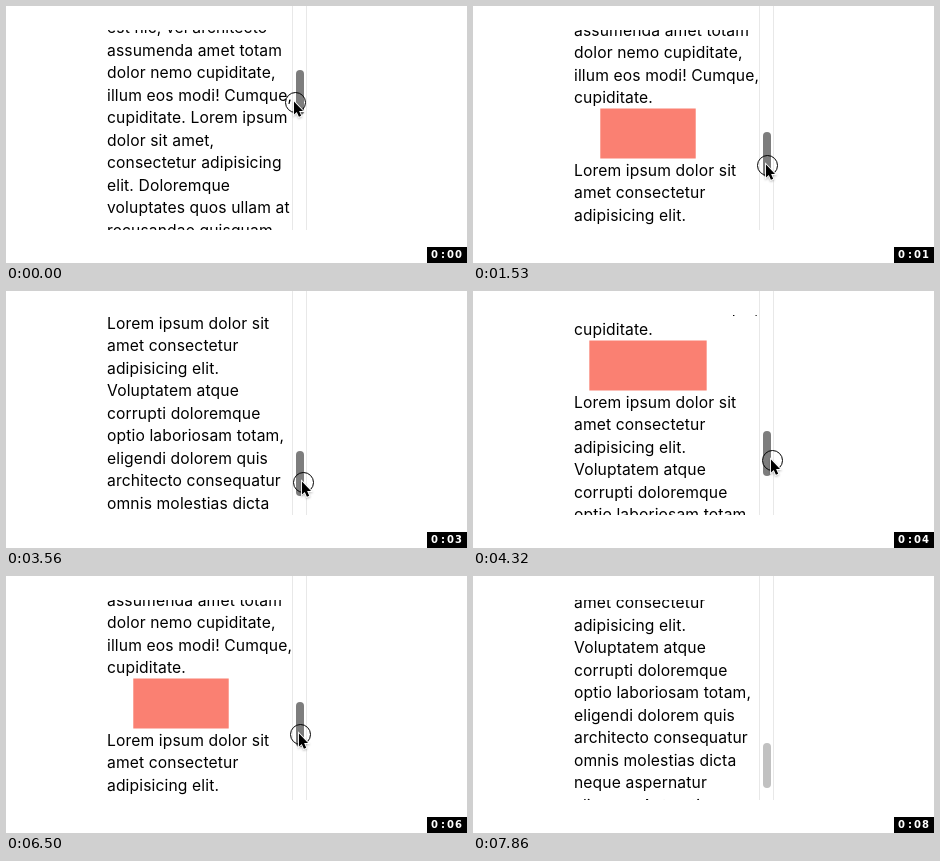
An HTML page for the animation above (8430 ms loop, 461 by 257 pixels).

```html
<!DOCTYPE html>
<html lang="la">
<head>
<meta charset="utf-8">
<title>Scroll-driven box</title>
<style>
  /* Integer properties snap positions to whole pixels */
  @property --y { syntax: "<number>"; inherits: true; initial-value: 64.3; }
  @property --lag { syntax: "<number>"; inherits: true; initial-value: 32; }
  @property --top { syntax: "<integer>"; inherits: true; initial-value: 0; }
  @property --thumb { syntax: "<integer>"; inherits: true; initial-value: 0; }
  @property --cx { syntax: "<integer>"; inherits: true; initial-value: 289; }
  @property --cy { syntax: "<integer>"; inherits: true; initial-value: 0; }
  @property --sec { syntax: "<integer>"; inherits: true; initial-value: 0; }

  html, body { margin: 0; width: 100%; height: 100%; overflow: hidden; background: #fff; }

  /* --y is the thumb's top edge; --top is where it puts the box on the stage */
  .stage {
    --top: calc(347.5 - 3.93 * (var(--y) - 64.3));
    --thumb: calc(var(--y) - .4);
    --seen: clamp(0, (224 - var(--top)) / 254, 1);
    position: relative; width: 461px; height: 257px; overflow: hidden;
    animation: drag 8430ms linear infinite;
  }
  .stage div, .stage svg { position: absolute; }

  .view { left: 100px; top: 24px; width: 188px; height: 200px; overflow: hidden; }
  .page {
    left: 0; top: 0;
    transform: translateY(calc((var(--top) - 361.5) * 1px));
    font: 15.65px/22.5px Inter, "Noto Sans", sans-serif;
    letter-spacing: .13px;
    color: #000;
  }
  .page p { position: relative; left: 1px; top: 1px; margin: 0; white-space: pre; }
  .page .box {
    position: static; width: 150px; height: 50px; background: #fa8072;
    transform: scaleX(calc(.3 + .7 * var(--seen)));
  }

  .track {
    left: 286px; top: 0; width: 13px; height: 224px;
    border: solid #e8e8e8; border-width: 0 1px;
  }
  .thumb {
    left: 290px; top: 0; width: 8px; height: 45px; border-radius: 4px;
    transform: translateY(calc(var(--thumb) * 1px));
    animation: release 8430ms step-end infinite;
  }
  .cursor {
    --cy: calc(var(--y) + var(--lag));
    left: -14px; top: -14px; width: 28px; height: 28px; overflow: visible;
    transform: translate(calc(var(--cx) * 1px), calc(var(--cy) * 1px));
    animation: sway 8430ms linear infinite, hide 8430ms step-end infinite;
  }

  .clock {
    left: 421px; top: 241px; width: 40px; height: 16px; background: #000; color: #fff;
    font: bold 10px/16px "DejaVu Sans", sans-serif;
    letter-spacing: 1px; text-indent: 4px; white-space: nowrap;
    animation: tick 8430ms steps(8) infinite;
  }
  .clock i { font-style: normal; margin: 0 1px 0 2px; }
  .clock::after { counter-reset: sec var(--sec); content: counter(sec); }

  @keyframes drag {
    0% { --y: 64.3; animation-timing-function: cubic-bezier(.333, .24, .667, .71); }
    18.15% { --y: 126.8; animation-timing-function: cubic-bezier(.333, .41, .667, .77); }
    31.554% { --y: 160; animation-timing-function: cubic-bezier(.333, .64, .667, 1); }
    37.248%, 40.095% { --y: 165; }
    40.095% { animation-timing-function: cubic-bezier(.333, 0, .667, .57); }
    51.246% { --y: 140.4; animation-timing-function: cubic-bezier(.333, .33, .667, .73); }
    66.429% { --y: 96.4; animation-timing-function: cubic-bezier(.333, .6, .667, 1); }
    69.039%, 70.819% { --y: 93; }
    70.819% { animation-timing-function: cubic-bezier(.333, 0, .667, .69); }
    77.106% { --y: 126.8; animation-timing-function: cubic-bezier(.333, .55, .667, 1); }
    90.391%, 100% { --y: 167.5; }
  }
  @keyframes sway {
    0% { --cx: 289; --lag: 32; }
    18.15% { --cx: 294; --lag: 32.2; }
    31.554% { --cx: 296; --lag: 32; }
    37.248%, 40.095% { --cx: 297; --lag: 31; }
    51.246% { --cx: 299; --lag: 28.9; }
    66.429% { --cx: 295; --lag: 30.8; }
    69.039%, 70.819% { --cx: 295; --lag: 30.8; }
    77.106% { --cx: 294; --lag: 31.3; }
    90.391%, 91.103% { --cx: 296; --lag: 32; }
    93.238%, 100% { --cx: 312; --lag: 102; }
  }
  @keyframes release {
    0% { background: #7d7d7d; }
    92.171%, 100% { background: #c1c1c1; }
  }
  @keyframes hide {
    0% { visibility: visible; }
    93.2%, 100% { visibility: hidden; }
  }
  @keyframes tick {
    0% { --sec: 0; }
    92.052%, 100% { --sec: 8; }
  }
</style>
</head>
<body>
<div class="stage">
  <div class="view">
    <div class="page">
<p>est hic, vel architecto
assumenda amet totam
dolor nemo cupiditate,
illum eos modi! Cumque,
cupiditate. Lorem ipsum
dolor sit amet,
consectetur adipisicing
elit. Doloremque
voluptates quos ullam at
recusandae quisquam
est hic, vel architecto
assumenda amet totam
dolor nemo cupiditate,
illum eos modi! Cumque,
cupiditate.</p>
<div class="box"></div>
<p>Lorem ipsum dolor sit
amet consectetur
adipisicing elit.
Voluptatem atque
corrupti doloremque
optio laboriosam totam,
eligendi dolorem quis
architecto consequatur
omnis molestias dicta
neque aspernatur
aliquam. Aut optio</p>
    </div>
  </div>
  <div class="track"></div>
  <div class="thumb"></div>
  <svg class="cursor" viewBox="-14 -14 28 28">
    <circle cx=".5" cy=".5" r="10" fill="none" stroke="#000"/>
    <path d="M-1-.5V12.5L1.8 9.9L3.9 14.8L6.2 13.8L4.1 9H8Z"
          fill="#000" stroke="#fff" stroke-width="1.8" paint-order="stroke"
          style="filter: drop-shadow(0 1px 1px #0004)"/>
  </svg>
  <div class="clock">0<i>:</i>0</div>
</div>
</body>
</html>
```
